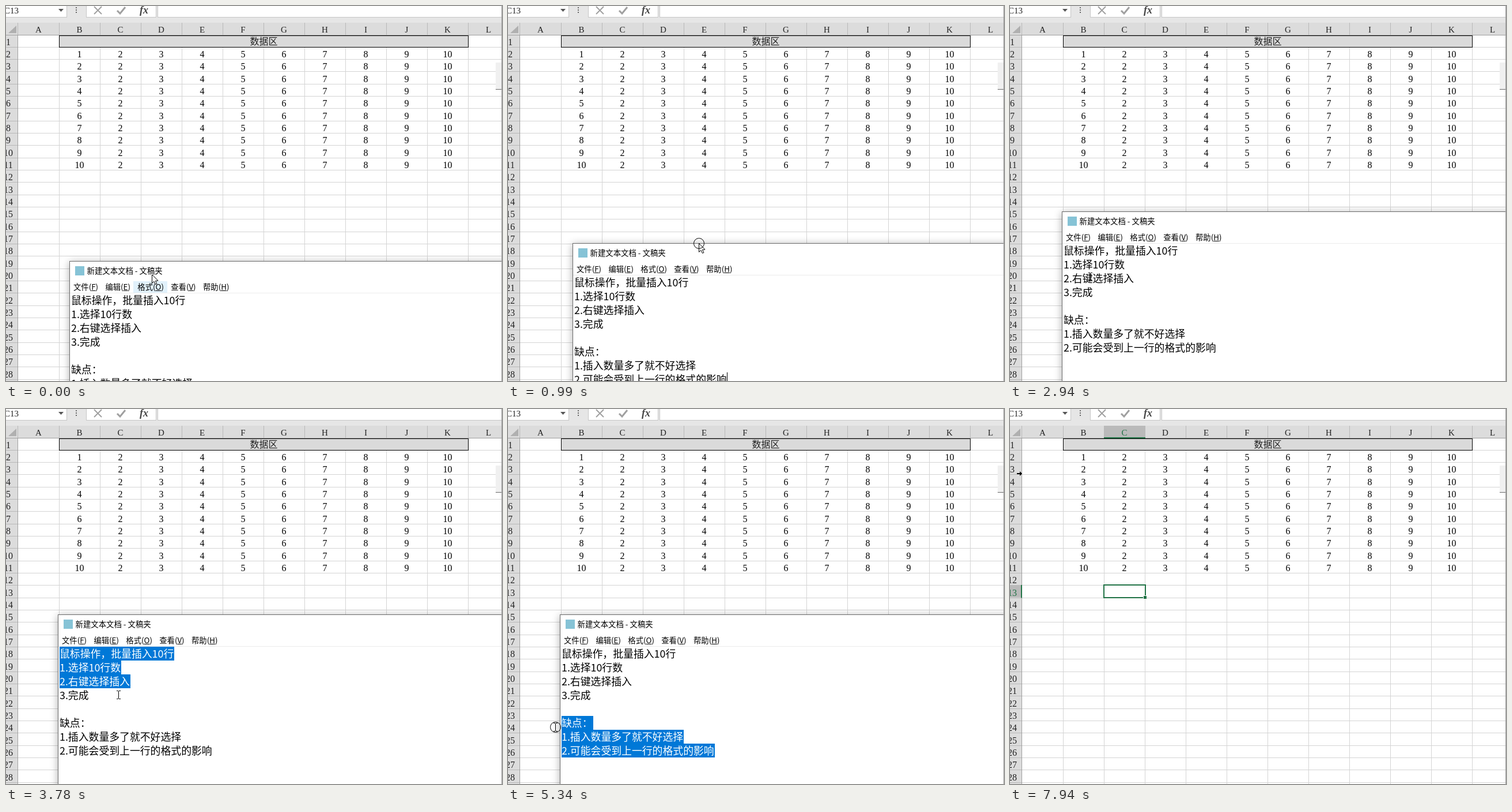
An HTML page with a canvas that plays this animation: 861 px wide and 650 px high, repeating every 8 s.

```html
<!DOCTYPE html>
<html lang="zh-CN">
<head>
<meta charset="utf-8">
<title>插入多行</title>
<style>
html, body { margin: 0; width: 100%; height: 100%; overflow: hidden; background: #fff; }
canvas { display: block; }
</style>
</head>
<body>
<canvas id="stage" width="861" height="650"></canvas>
<script>
const W = 861, H = 650, LOOP = 8000, TICK = 133.5;
const ctx = document.getElementById('stage').getContext('2d');
const SERIF = '"Liberation Serif", "Noto Sans CJK SC", serif';
const SANS = '"Noto Sans CJK SC", "Noto Sans CJK", sans-serif';
const CELL_FONT = '16px ' + SERIF, NOTE_FONT = '17.85px ' + SANS, MENU_FONT = '13.33px ' + SANS;
const GREEN = '#217346', HEAD = '#dcdcdc', HEAD_ON = '#bababa', EDGE = '#b8b8b8', GRID = '#d4d4d4';
const COL = 71, ROW = 21.33, LEFT = 21, TOP = 50;
const LINE = 24, TEXT_X = 3, TEXT_Y = 56;

const MENUS = ['文件F', '编辑E', '格式O', '查看V', '帮助H'];
const NOTE = ['鼠标操作，批量插入10行', '1.选择10行数', '2.右键选择插入', '3.完成', '',
  '缺点：', '1.插入数量多了就不好选择', '2.可能会受到上一行的格式的影响'];

const HIDE_NOTE = 7430;
const dragNote = { start: 570, end: 1260 };
const selectTop = { start: 3230, end: 3640, settle: 3740, clear: 4400 };
const selectBottom = { start: 4670, end: 5600, settle: 5340, clear: LOOP };
const activate = { start: HIDE_NOTE, end: 7560 };
const PRESSES = [dragNote, selectTop, selectBottom, activate];

// Each leg: start time, end time, destination x, y
const POINTER = { from: [253, 465], legs: [
  [130, 430, 331, 460], [700, 930, 331, 411], [930, 1200, 309, 376], [1200, 1860, 250, 603],
  [2400, 3200, 101, 424], [3470, 3730, 195, 495], [4000, 4530, 364, 606],
  [4670, 5340, 82, 551], [5340, 5870, 454, 636], [6800, 7070, 217, 293], [7430, 7870, 16, 112]] };
const NOTE_MOVE = { from: [110, 442], legs: [[800, 930, 112, 411], [930, 1200, 90, 356]] };

const clamp = (v, lo, hi) => Math.max(lo, Math.min(hi, v));

function follow({ from, legs }, t) {
  let [x, y] = from;
  for (const [start, end, toX, toY] of legs) {
    const u = clamp((t - start) / (end - start), 0, 1);
    const ease = u * u * (3 - 2 * u);
    x += (toX - x) * ease;
    y += (toY - y) * ease;
  }
  return [Math.round(x), Math.round(y)];
}

function rect(x, y, w, h, color) {
  ctx.fillStyle = color;
  ctx.fillRect(x, y, w, h);
}

function text(s, x, y, font, color = '#000', align = 'left') {
  ctx.font = font;
  ctx.fillStyle = color;
  ctx.textAlign = align;
  ctx.fillText(s, x, y);
}

function path(points, { fill, stroke, width = 1 }) {
  ctx.beginPath();
  points.forEach(([x, y]) => ctx.lineTo(x, y));
  if (fill) { ctx.closePath(); ctx.fillStyle = fill; ctx.fill(); }
  if (stroke) { ctx.strokeStyle = stroke; ctx.lineWidth = width; ctx.stroke(); }
}

const colX = c => LEFT + COL * c;
const midX = c => colX(c) + 35.5;
const rowY = r => Math.floor(TOP + ROW * r);
const baseY = r => Math.round(TOP + ROW * (r - 0.5) + 7);

function drawFormulaBar() {
  rect(0, 0, W, 29, '#e6e6e6');
  for (const [x, w] of [[-1, 106], [139, 121], [263, 600]]) {
    rect(x, 0, w + 1, 20, '#c6c6c6');
    rect(x + 1, 0, w - 1, 19, '#fff');
  }
  text('C13', 22, 13, '15px ' + SERIF, '#222', 'right');
  path([[91, 5], [100, 5], [95.5, 10]], { fill: '#555' });
  for (let y = 2; y <= 10; y += 4) rect(121, y, 2, 2, '#666');
  const icon = { stroke: '#a0a0a0', width: 2 };
  path([[153, 1], [166, 14]], icon);
  path([[166, 1], [153, 14]], icon);
  path([[193, 8], [198, 13], [207, 2]], { ...icon, width: 3 });
  text('fx', 232, 13, 'italic bold 18px ' + SERIF, '#444');
}

function drawHeaders(active) {
  rect(0, 29, W, 21, HEAD);
  rect(0, TOP, LEFT, H, HEAD);
  for (let c = 0; c < 12; c++) {
    const on = active && c === 2;
    if (on) rect(colX(c), 29, COL, 21, HEAD_ON);
    rect(colX(c) - (c ? 0 : 1), 29, 1, 21, EDGE);
    text('ABCDEFGHIJKL'[c], midX(c), 46, '15px ' + SERIF, on ? GREEN : '#222', 'center');
  }
  for (let r = 1; r <= 28; r++) {
    const on = active && r === 13;
    if (on) rect(0, rowY(r - 1), LEFT, ROW, HEAD_ON);
    rect(0, rowY(r), 20, 1, EDGE);
    text(r, 4, baseY(r), CELL_FONT, on ? GREEN : '#222', 'center');
  }
  rect(0, TOP, W, 1, '#a0a0a0');
  rect(20, TOP, 1, H, '#a0a0a0');
  path([[18, 34], [18, 47], [4, 47]], { fill: '#b0b0b0' });
}

function drawActiveCell() {
  const x = colX(2), y = rowY(12);
  rect(x, 49, COL + 1, 2, GREEN);
  rect(19, y, 2, ROW + 1, GREEN);
  ctx.strokeStyle = GREEN;
  ctx.lineWidth = 2;
  ctx.strokeRect(x, y, COL + 1, 22);
  rect(x + COL - 3, y + 18, 6, 6, '#fff');
  rect(x + COL - 2, y + 19, 5, 5, GREEN);
}

function drawSheet(active) {
  rect(0, 0, W, H, '#fff');
  drawFormulaBar();
  for (let c = 1; c <= 11; c++) rect(colX(c), TOP, 1, H, GRID);
  for (let r = 1; r <= 28; r++) rect(LEFT, rowY(r), W, 1, GRID);
  drawHeaders(active);

  rect(colX(1), TOP + 1, COL * 10 + 1, 21, '#000');
  rect(colX(1) + 1, TOP + 2, COL * 10 - 1, 19, '#dadada');
  text('数据区', 447.5, 67, CELL_FONT.replace(SERIF, SANS), '#222', 'center');
  for (let r = 2; r <= 11; r++)
    for (let c = 1; c <= 10; c++)
      text(c === 1 ? r - 1 : c, midX(c), baseY(r), CELL_FONT, '#000', 'center');

  if (active) drawActiveCell();
  rect(850, 98, 10, 46, '#f0f0f0');
  rect(850, 144, 10, 1, '#696969');
}

function drawNoteText(x, y, color) {
  NOTE.forEach((s, i) => text(s, x, y + i * LINE + 18.5, NOTE_FONT, color));
}

function drawSelection(x, y, t) {
  const drag = [selectTop, selectBottom].find(d => t >= d.start && t < d.clear);
  if (!drag) return;
  const [px, py] = follow(POINTER, Math.min(t, drag.settle));
  const at = Math.floor((py - y) / LINE);
  const [first, end] = drag === selectTop ? [0, at] : [at, NOTE.length];
  ctx.save();
  ctx.font = NOTE_FONT;
  ctx.beginPath();
  for (let i = first; i < end; i++) {
    const width = Math.round(ctx.measureText(NOTE[i]).width) + 1;
    const skip = i === at ? clamp(px - x, 0, width) : 0;
    ctx.rect(x + skip, y + i * LINE, width - skip, LINE);
  }
  ctx.clip();
  rect(0, 0, W, H, '#0078d7');
  drawNoteText(x, y, '#fff');
  ctx.restore();
}

function drawMenus(x, y, hover) {
  let mx = x + 7;
  for (const menu of MENUS) {
    const key = menu[2], head = menu.slice(0, 2) + '(', label = head + key + ')';
    ctx.font = MENU_FONT;
    const [headW, keyW, labelW] = [head, key, label].map(s => ctx.measureText(s).width);
    if (key === hover) rect(Math.round(mx - 7), y + 35, 59, 20, '#e1f1fb');
    text(label, mx, y + 50, MENU_FONT);
    rect(mx + headW, y + 51, keyW, 1, '#000');
    mx += labelW + 12.4;
  }
}

function drawCaret(x, y, t) {
  const blinkOn = t >= 900 && Math.floor((t - 900) / 530) % 2 === 0;
  if (t < selectTop.start && blinkOn) rect(x + 265, y + 7 * LINE, 1, LINE, '#000');
  else if (t >= selectTop.start && t < 3510) rect(x, y, 1, LINE, '#000');
}

function drawNote(t) {
  const [x, y] = follow(NOTE_MOVE, t);
  const tx = x + TEXT_X, ty = y + TEXT_Y;
  ctx.save();
  ctx.shadowColor = 'rgba(0,0,0,.32)';
  ctx.shadowBlur = 13;
  ctx.shadowOffsetY = 2;
  rect(x, y, W, H, '#6a6a6a');
  ctx.restore();
  rect(x + 1, y + 1, W, H, '#fff');
  rect(x + 10, y + 9, 16, 16, '#86c3d6');
  text('新建文本文档 - 文稿夹', x + 30.5, y + 22, '13.4px ' + SANS);
  drawMenus(x, y, t < TICK ? 'O' : '');
  rect(x + 1, y + 55, W, 1, '#ececec');
  drawNoteText(tx, ty, '#000');
  drawSelection(tx, ty, t);
  drawCaret(tx, ty, t);
}

function drawArrow(x, y) {
  const shape = [[0, 0], [0, 15], [3.5, 11.8], [6, 17], [8.4, 16], [6, 11], [10.5, 10.6], [0, 0]];
  path(shape.map(([a, b]) => [x + a + 0.5, y + b + 0.5]), { fill: '#fff', stroke: '#000' });
}

function drawBeam(x, y) {
  rect(x, y - 6, 1, 13, '#000');
  for (const dy of [-7, 7]) {
    rect(x - 3, y + dy, 3, 1, '#000');
    rect(x + 1, y + dy, 3, 1, '#000');
  }
}

function drawCross(x, y) {
  for (const [grow, color] of [[1, '#000'], [0, '#fff']]) {
    const long = 8 + grow, thin = 2 + grow;
    rect(x - thin, y - long, thin * 2, long * 2, color);
    rect(x - long, y - thin, long * 2, thin * 2, color);
  }
}

function drawRowArrow(x, y) {
  rect(x - 4, y - 1, 6, 2, '#000');
  path([[x + 1, y - 4], [x + 5, y], [x + 1, y + 4]], { fill: '#000' });
}

function drawPointer(t, noteOpen) {
  const [x, y] = follow(POINTER, t);
  const [noteX, noteY] = follow(NOTE_MOVE, t);
  if (!noteOpen) (x < LEFT ? drawRowArrow : drawCross)(x, y);
  else if (x > noteX - 10 && y > noteY + TEXT_Y) drawBeam(x, y);
  else drawArrow(x, y);
  if (PRESSES.some(p => t >= p.start && t < p.end)) {
    ctx.beginPath();
    ctx.arc(x + 0.5, y + 0.5, 9, 0, Math.PI * 2);
    ctx.strokeStyle = '#000';
    ctx.lineWidth = 1;
    ctx.stroke();
  }
}

function draw(now) {
  const time = now % LOOP;
  const t = Math.floor(time / TICK) * TICK;
  const noteOpen = time < HIDE_NOTE;
  drawSheet(!noteOpen);
  if (noteOpen) drawNote(t);
  rect(860, 0, 1, H, '#a0a0a0');
  drawPointer(t, noteOpen);
  requestAnimationFrame(draw);
}

draw(0);
</script>
</body>
</html>
```
